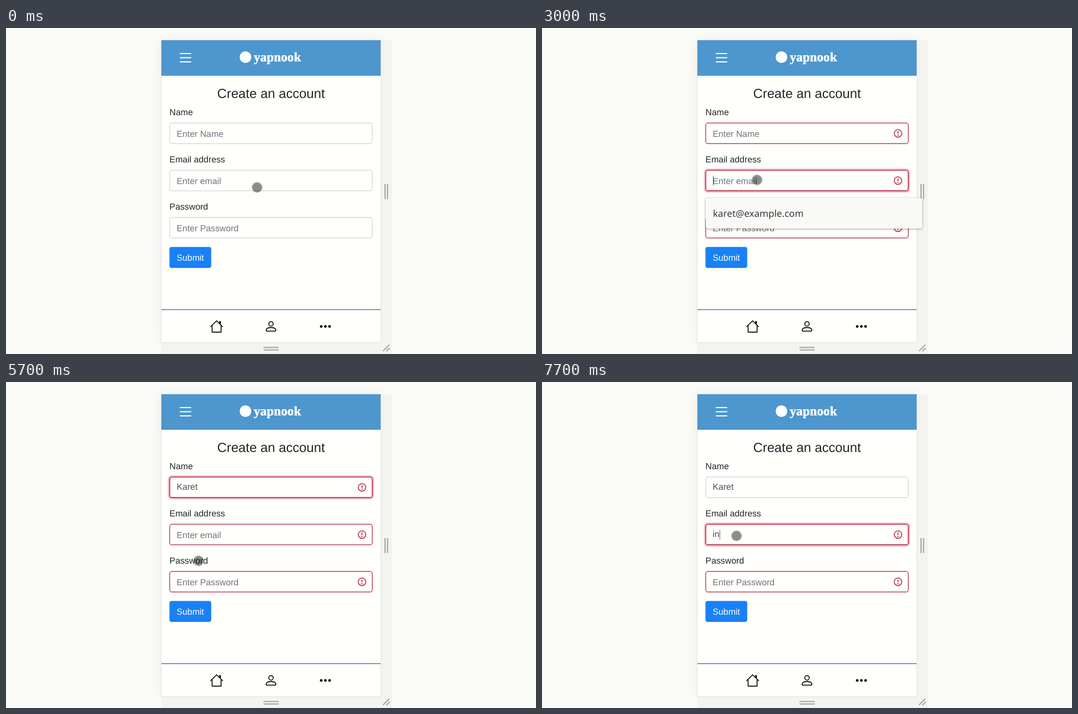
Write an HTML page that moves like this. It is 955 px wide and 587 px high and loops after 8 s.

```html
<!DOCTYPE html>
<html lang="en">
<head>
<meta charset="utf-8">
<title>Create an account</title>
<style>
html, body { margin: 0; width: 100%; height: 100%; overflow: hidden; background: #fafaf7; }
body { position: relative; text-rendering: geometricPrecision; }
svg { position: absolute; left: 0; top: 0; }
svg, .typed { font: 15.82px "Liberation Sans", Arial, sans-serif; }

.label { fill: #212529; }
.hint { fill: #6c757d; }
.popup text { font: 500 17px "Noto Sans", sans-serif; fill: #3a3a3a; }
.popup rect { fill: #f9f9f7; filter: drop-shadow(0 1px 2px rgba(0,0,0,.35)); }
.brand { font: bold 23.2px "Liberation Serif", serif; fill: #fff; stroke: #fff; stroke-width: .5; }

.typed {
  position: absolute; left: 307.5px; height: 18px; line-height: 18px;
  overflow: hidden; white-space: nowrap; color: #495057;
  border-right: 1px solid transparent;
}
.disc {
  position: absolute; left: -10.5px; top: -10.5px; width: 18px; height: 18px; border-radius: 50%;
  background: rgba(0,0,0,.45) padding-box; border: 1.5px solid rgba(190,190,186,.7);
}

.fade, .hard { animation: 8s linear -20ms infinite; }
.hard { animation-timing-function: step-end; }

#nameError { animation-name: nameError; }
#emailError, #passwordError { animation-name: error; }
#nameRing { animation-name: nameRing; }
#emailRing { animation-name: emailRing; }
#pressed { animation-name: pressed; }
#nameHint { animation-name: nameHint; }
#emailHint { animation-name: emailHint; }
#namePopup { animation-name: namePopup; }
#emailPopup { animation-name: emailPopup; }
#nameTyped { top: 181px; animation-name: nameTyped; }
#emailTyped { top: 266px; animation-name: emailTyped; }
.disc { animation-name: pointer; }

@keyframes error { 0%, 20% { opacity: 0 } 21.9%, 100% { opacity: 1 } }
@keyframes nameError { 0%, 20% { opacity: 0 } 21.9%, 77.5% { opacity: 1 } 79.4%, 100% { opacity: 0 } }
@keyframes nameRing { 0%, 43.1% { opacity: 0 } 44.9%, 75.6% { opacity: 1 } 77.5%, 100% { opacity: 0 } }
@keyframes emailRing {
  0%, 34.4% { opacity: 0 } 36.25%, 43.1% { opacity: 1 }
  45%, 89.4% { opacity: 0 } 91.2%, 100% { opacity: 1 }
}
@keyframes pressed {
  0%, 20% { opacity: 0 } 21.9%, 34.4% { opacity: 1 }
  36.25%, 75.6% { opacity: 0 } 77.5%, 89.4% { opacity: 1 } 91.2%, 100% { opacity: 0 }
}
@keyframes nameHint { 0% { opacity: 1 } 52.5%, 100% { opacity: 0 } }
@keyframes emailHint { 0% { opacity: 1 } 93.75%, 100% { opacity: 0 } }
@keyframes namePopup { 0% { opacity: 0 } 45% { opacity: 1 } 62.5%, 100% { opacity: 0 } }
@keyframes emailPopup {
  0% { opacity: 0 } 36.25% { opacity: 1 } 43.75% { opacity: 0 }
  91.25% { opacity: 1 } 95%, 100% { opacity: 0 }
}
@keyframes nameTyped {
  0% { width: 0; border-color: transparent }
  43.75% { width: 0; border-color: #666 }
  48.75% { width: 0; border-color: transparent }
  52.5% { width: 10.5px; border-color: #666 }
  57.5% { width: 19.3px; border-color: #666 }
  58.75% { width: 24.6px; border-color: #666 }
  61.25% { width: 33.4px; border-color: #666 }
  62.5% { width: 38px; border-color: #666 }
  67.5%, 100% { width: 38px; border-color: transparent }
}
@keyframes emailTyped {
  0% { width: 0; border-color: transparent }
  35% { width: 0; border-color: #666 }
  40% { width: 0; border-color: transparent }
  90% { width: 0; border-color: #666 }
  93.75% { width: 3.5px; border-color: #666 }
  95%, 100% { width: 12.2px; border-color: #666 }
}
@keyframes pointer {
  0% { transform: translate(452.5px, 287px) }
  1.25% { transform: translate(449px, 283px) }
  3.75% { transform: translate(446px, 279px) }
  5% { transform: translate(446px, 279px); animation-timing-function: steps(3) }
  8.75% { transform: translate(445px, 274px) }
  10% { transform: translate(445px, 274px); animation-timing-function: steps(4) }
  15% { transform: translate(339.5px, 410px) }
  18.75% { transform: translate(338px, 412.5px) }
  26.25% { transform: translate(338px, 412.5px); animation-timing-function: steps(4) }
  31.25% { transform: translate(390px, 287.5px) }
  32.5% { transform: translate(390px, 287.5px); animation-timing-function: steps(2) }
  35% { transform: translate(387.5px, 273.5px) }
  38.75% { transform: translate(387.5px, 273.5px); animation-timing-function: steps(2) }
  41.25% { transform: translate(373px, 195.5px) }
  71.25% { transform: translate(347px, 322px) }
  72.5% { transform: translate(347px, 322px); animation-timing-function: steps(2) }
  75% { transform: translate(342px, 412px) }
  83.75% { transform: translate(342px, 412px); animation-timing-function: steps(3) }
  87.5%, 100% { transform: translate(350.5px, 277px) }
}
</style>
</head>
<body>
<svg width="955" height="587" viewBox="0 0 955 587">
  <defs>
    <rect id="box" x="295" y="171.2" width="365" height="37" rx="4"/>
    <g id="error" fill="none" stroke="#c0304c">
      <use href="#box" stroke-width="1.2"/>
      <circle cx="641.5" cy="189.8" r="6.8" stroke-width="1.6"/>
      <path d="M641.5 185.8v4.8" stroke-width="1.9"/>
      <circle cx="641.5" cy="193.2" r="1.1" fill="#c0304c" stroke="none"/>
    </g>
    <g id="ring" fill="none">
      <rect x="293.2" y="169.4" width="368.6" height="40.6" rx="5.5" stroke="#f2c0ca" stroke-width="3"/>
      <use href="#box" stroke="#c0304c" stroke-width="1.4"/>
    </g>
    <filter id="soft" x="-20%" y="-20%" width="140%" height="140%"><feGaussianBlur stdDeviation="10"/></filter>
  </defs>

  <!-- device frame and resize handles -->
  <rect x="280" y="22" width="395" height="544" opacity=".06" filter="url(#soft)"/>
  <path d="M675 22h21v565H280v-21h395z" fill="#f3f3f0"/>
  <rect x="279.5" y="22" width="396" height="544.5" fill="#fffffc" stroke="#e2e2df"/>
  <path d="M683 281v27M687.5 281v27M464 575.3h27M464 579.7h27M679.5 581.5l11-11M685.5 582l6-6"
    stroke="#a2a2a0" stroke-width="2"/>

  <!-- header -->
  <path d="M280 22h395v64H280z" fill="#4d96ce"/>
  <path d="M314 46h19M314 53.5h19M314 61h19" stroke="#fff" stroke-width="1.9" stroke-linecap="round"/>
  <circle cx="431.5" cy="52.5" r="10.5" fill="#fff"/>
  <text class="brand" x="446.5" y="60">yapnook</text>

  <!-- form -->
  <text class="label" x="477.6" y="125.5" font-size="23.74" text-anchor="middle">Create an account</text>
  <g class="label">
    <text x="294.6" y="157">Name</text>
    <text x="294.6" y="242">Email address</text>
    <text x="294.6" y="327">Password</text>
  </g>
  <g fill="#fffffc" stroke="#ced3d9" stroke-width="1.2">
    <use href="#box"/>
    <use href="#box" y="85"/>
    <use href="#box" y="170"/>
  </g>
  <use href="#error" id="nameError" class="fade"/>
  <use href="#error" id="emailError" class="fade" y="85"/>
  <use href="#error" id="passwordError" class="fade" y="170"/>
  <use href="#ring" id="nameRing" class="fade"/>
  <use href="#ring" id="emailRing" class="fade" y="85"/>
  <g class="hint">
    <text id="nameHint" class="hard" x="307.5" y="195.5">Enter Name</text>
    <text id="emailHint" class="hard" x="307.5" y="280.5">Enter email</text>
    <text x="307.5" y="365.5">Enter Password</text>
  </g>
  <rect x="294.5" y="394.3" width="75.3" height="37.7" rx="4" fill="#1a80f5"/>
  <rect id="pressed" class="fade" x="293" y="392.8" width="78.3" height="40.7" rx="5"
    fill="#146acf" stroke="#96c7fc" stroke-width="3"/>
  <text x="307.5" y="419" fill="#fff">Submit</text>

  <!-- bottom navigation -->
  <path d="M280 507.2h395" stroke="#5294c9" stroke-width="1.7"/>
  <g fill="none" stroke="#000" stroke-width="1.6" stroke-linejoin="round" stroke-linecap="round">
    <path d="M368.8 537.8l10.7-10.6 10.7 10.6M371.4 536v11.6h16.2V536"/>
    <path d="M384.6 528.8h1.8v3.4z" fill="#000"/>
    <circle cx="477.5" cy="532.7" r="4"/>
    <path d="M470.2 545.8h14.6q1.4 0 1.4-1.4c0-2.6-2.6-5-8.7-5s-8.7 2.4-8.7 5q0 1.4 1.4 1.4z"/>
  </g>
  <circle cx="568" cy="537.4" r="2.4"/>
  <circle cx="575.5" cy="537.4" r="2.4"/>
  <circle cx="583" cy="537.4" r="2.4"/>

  <!-- suggestions -->
  <g id="namePopup" class="popup hard">
    <rect x="295" y="221" width="390" height="55" rx="4"/>
    <text x="308" y="255">Karet</text>
  </g>
  <g id="emailPopup" class="popup hard">
    <rect x="295" y="306" width="390" height="55" rx="4"/>
    <text x="308" y="340">karet@example.com</text>
  </g>
</svg>
<div id="nameTyped" class="typed hard">Karet</div>
<div id="emailTyped" class="typed hard">in</div>
<div class="disc hard"></div>
</body>
</html>
```
